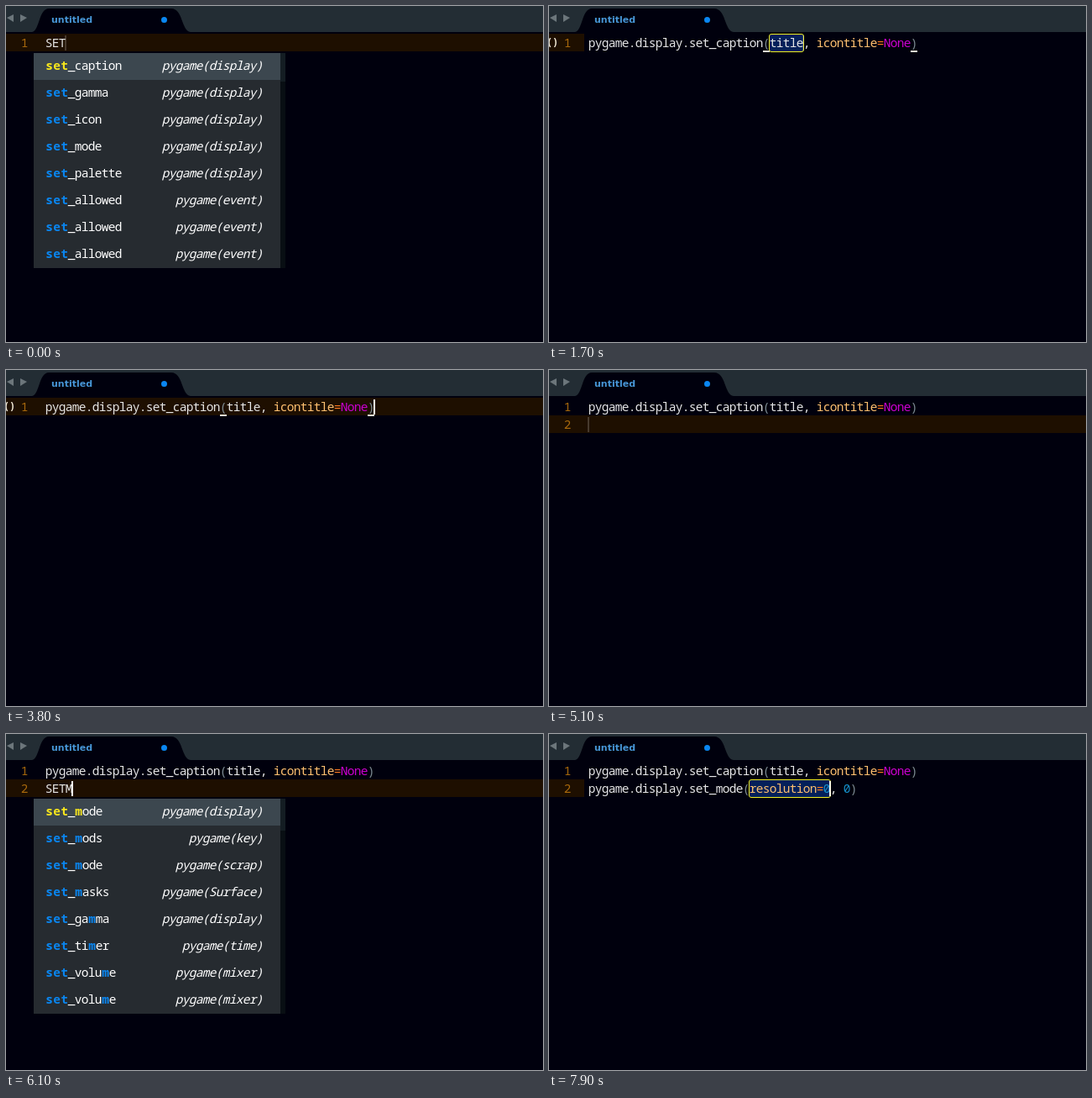
These frames come from a looping animation (640 px wide and 400 px high, 8 s). An HTML page with a canvas:

```html
<!DOCTYPE html>
<html>
<head>
<meta charset="utf-8">
<style>
html, body { margin: 0; width: 100%; height: 100%; overflow: hidden; background: #00000d; }
canvas { display: block; }
</style>
</head>
<body>
<canvas id="stage" width="640" height="400"></canvas>
<script>
const ctx = document.getElementById('stage').getContext('2d');
const LOOP = 8000, STEP = 100, CHAR = 8, BOLD_CHAR = 9, LEFT = 47, LINE = 21, TOP = 33, ROW = 32;
const MONO = '14.5px "Noto Sans Mono", "DejaVu Sans Mono", monospace';
const WHITE = '#e6e6e6', DIM = '#7d8b92', ORANGE = '#ffc070', BLUE = '#0a86f0';

const CAPTION_CALL = [
  ['pygame.display.set_caption', WHITE], ['(', DIM], ['title, ', WHITE],
  ['icontitle', ORANGE], ['=', '#ff7a20'], ['None', '#cc00d0'], [')', DIM]
];
const MODE_CALL = [
  ['pygame.display.set_mode', WHITE], ['(', DIM], ['resolution', ORANGE], ['=', '#ff7a20'],
  ['0', '#1690cc'], [', ', WHITE], ['0', '#1690cc'], [')', DIM]
];

// Square brackets mark the matched letters.
const SET_LIST = {
  thumb: 34,
  rows: [
    ...['caption', 'gamma', 'icon', 'mode', 'palette'].map(n => ['[set]_' + n, 'display']),
    ...Array(3).fill(['[set]_allowed', 'event'])
  ]
};
const S_LIST = {
  thumb: 6,
  rows: [...Array(7).fill(['[S]ound', 'mixer']), ['[S]prite', 'sprite']]
};
const SETM_LIST = {
  thumb: 38,
  rows: [
    ['[set]_[m]ode', 'display'], ['[set]_[m]ods', 'key'], ['[set]_[m]ode', 'scrap'],
    ['[set]_[m]asks', 'Surface'], ['[set]_ga[m]ma', 'display'], ['[set]_ti[m]er', 'time'],
    ['[set]_volu[m]e', 'mixer'], ['[set]_volu[m]e', 'mixer']
  ]
};

// Each timeline holds [start, value]; the latest started value applies.
const SECOND_LINE = [[0, ''], [5200, 'S'], [5400, 'SE'], [5500, 'SET'], [6000, 'SETM']];
const POPUPS = [
  [0, SET_LIST], [700, null], [5300, S_LIST], [5500, SET_LIST], [6100, SETM_LIST], [7900, null]
];
const CARET_RESETS = [-1000, 400, 700, 3700, 3800, 4100, 5200, 5500, 6000, 6100, 7600];
const CARET_ALPHA = [1, 1, 1, 0.9, 0.65, 0.3, 0, 0, 0, 0, 0.18, 0.6];

const at = (timeline, t) => timeline.filter(([start]) => start <= t).pop()[1];
const column = n => LEFT + n * CHAR;

function rect(x, y, w, h, color) {
  ctx.fillStyle = color;
  ctx.fillRect(x, y, w, h);
}

function text(string, x, y, color, font) {
  ctx.font = font;
  ctx.fillStyle = color;
  ctx.fillText(string, x, y);
}

// Sets monospaced text on a whole-pixel grid, as a hinting editor does.
function code(string, x, y, color, style = '') {
  const pitch = style === 'bold' ? BOLD_CHAR : CHAR;
  const font = style + ' ' + MONO;
  ctx.textAlign = 'center';
  [...string].forEach((c, i) => text(c, x + (i + 0.5) * pitch, y, color, font));
  ctx.textAlign = 'left';
  return x + string.length * pitch;
}

function codeRuns(runs, y) {
  let x = LEFT;
  for (const [string, color, style] of runs) x = code(string, x, y, color, style);
}

function shape(path, color) {
  ctx.fillStyle = color;
  ctx.fill(new Path2D(path));
}

function drawTabBar() {
  rect(0, 0, 640, 31, '#232d34');
  shape('M31 31C40 30 39 3 51 3H197C211 3 209 30 220 31Z', '#00000d');
  shape('M1 14L9 10V19ZM25 14L17 10V19Z', '#6c767b');
  text('untitled', 54, 20, '#4796d6', 'bold 11px "DejaVu Sans", sans-serif');
  shape('M185 16.5a3.5 3.5 0 1 0 7 0a3.5 3.5 0 1 0 -7 0Z', BLUE);
}

function drawSelection(start, length, y) {
  ctx.beginPath();
  ctx.roundRect(column(start) - 0.5, y + 0.5, length * CHAR + 1, 21, 2.5);
  ctx.fillStyle = '#04205a';
  ctx.fill();
  ctx.strokeStyle = '#f2ee20';
  ctx.lineWidth = 1;
  ctx.stroke();
}

function drawBracketMarks() {
  const font = 'bold 12px "Noto Sans Mono", monospace';
  text('(', -3, 47, '#f2ead8', font);
  text(')', 4, 47, '#f2ead8', font);
  for (const n of [26, 48]) rect(column(n), 53, CHAR, 2, '#e8e4d4');
}

function drawPopup({ rows, thumb }, y, alpha) {
  ctx.globalAlpha = alpha;
  rect(33, y, 294, rows.length * ROW, '#262b30');
  rect(33, y, 294, ROW, '#3c474f');
  rect(327, y, 6, rows.length * ROW, '#080e13');
  rect(327, y, 6, thumb, '#141d23');
  rows.forEach(([name, module], i) => {
    const base = y + i * ROW + 20;
    const match = i ? BLUE : '#f8e71c';
    codeRuns(name.split(/[[\]]/).map((part, k) =>
      k % 2 ? [part, match, 'bold'] : [part, '#fff']), base);
    const label = `pygame(${module})`;
    code(label, 306 - label.length * CHAR, base, '#fff', 'italic');
  });
  ctx.globalAlpha = 1;
}

function draw(t) {
  const onSecond = t >= 4100, captionDone = t >= 400, modeDone = t >= 7600;
  const selecting = modeDone || (captionDone && t < 3700);
  const y = TOP + (onSecond ? LINE : 0);
  const typed = onSecond ? at(SECOND_LINE, t) : 'SET';

  rect(0, 0, 640, 400, '#00000d');
  drawTabBar();
  rect(0, y, selecting ? 42 : 640, LINE, '#1e0f00');
  if (selecting) modeDone ? drawSelection(24, 12, y) : drawSelection(27, 5, y);

  code('1', 18, 49, '#a8690c');
  codeRuns(captionDone ? CAPTION_CALL : [[typed, WHITE]], 49);
  if (onSecond) {
    code('2', 18, 70, '#a8690c');
    codeRuns(modeDone ? MODE_CALL : [[typed, WHITE]], 70);
  }
  if (t >= 900 && t < 4600) drawBracketMarks();

  let caretColumn = typed.length;
  if (modeDone) caretColumn = 36;
  else if (captionDone && !onSecond) caretColumn = selecting ? 32 : 49;
  const age = t - CARET_RESETS.filter(start => start <= t).pop();
  ctx.globalAlpha = CARET_ALPHA[age / STEP % CARET_ALPHA.length];
  rect(column(caretColumn) - 1, y + 2, 2, 18, '#fff');
  ctx.globalAlpha = 1;

  const popup = at(POPUPS, t);
  if (popup) {
    const closing = modeDone ? t - 7500 : captionDone && !onSecond ? t - 300 : 0;
    drawPopup(popup, y + 23, 1 - closing / 400);
  }
}

const begin = performance.now();
function frame() {
  const elapsed = (performance.now() - begin) % LOOP;
  draw(Math.floor(elapsed / STEP) * STEP);
  requestAnimationFrame(frame);
}
frame();
</script>
</body>
</html>
```
